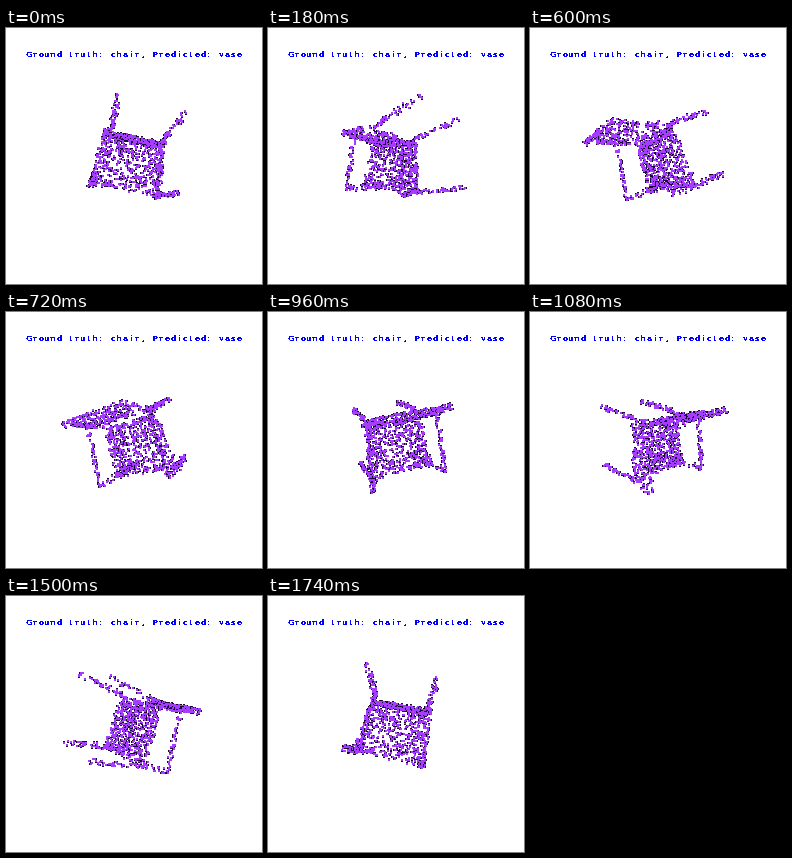
A matplotlib script that plays this animation: 256 px wide and 256 px high, repeating every 1.8 s.

```python
import numpy as np
import matplotlib.pyplot as plt
from matplotlib.animation import FuncAnimation
from matplotlib.colors import to_rgba

SIZE, FRAMES, INTERVAL = 256, 30, 60
CENTER = SIZE / 2
CAMERA = CENTER / np.tan(np.radians(30))  # 60 degree field of view
PURPLE, DARK = "#a53cff", "#1c0830"
SHADE_DEPTH = 7
TITLE = "Ground truth: chair, Predicted: vase"
PITCH = 6

plt.rcParams["text.antialiased"] = False
rng = np.random.default_rng(12)


def vec(*p):
    return np.array(p, float)


# Seat corners: back/front, left/right
seat_bl, seat_br = vec(-23, 23, 2), vec(30, 11, -6)
seat_fl, seat_fr = vec(-41, -26, 12), vec(24, -38, 3)
# Leg tips
tip_bl, tip_br = vec(-12, 47.5, 51.6), vec(41.6, 35, 44.6)
tip_fl, tip_fr = vec(-27, -17.5, 63.5), vec(32.5, -28, 56.3)
# Armrests
arm_bl, arm_br = vec(-33, 26, -25), vec(31, 14, -33)
arm_fl, arm_fr = vec(-45, -30, -15), vec(25, -46, -23)
# Top of the backrest
top_l, top_r = vec(-32, 26, -58), vec(25, 13.5, -65)

NORMAL = vec(0.15, 0.145, 0.975)
# Rear legs start a little behind the seat
REAR = vec(1.8, 7.7, -1.4)


def bar(a, b, n, width=2.0):
    t = rng.random((n, 1))
    return a + t * (b - a) + rng.uniform(-width, width, (n, 3))


def panel(a, b, c, d, n, normal, half):
    """Two faces of a thin slab with corners a-b and c-d."""
    s, t = rng.random((2, n, 1))
    mid = (1 - t) * ((1 - s) * a + s * b) + t * ((1 - s) * c + s * d)
    side = rng.choice([-half, half], (n, 1)) + rng.normal(0, 0.5, (n, 1))
    return mid + side * normal


def build_chair():
    back_normal = np.cross(top_r - top_l, NORMAL)
    back_normal /= np.linalg.norm(back_normal)
    parts = [
        panel(seat_bl, seat_br, seat_fl, seat_fr, 430, NORMAL, 3.5),
        panel(arm_bl, arm_br, top_l, top_r, 170, back_normal, 2),
        bar(top_l, top_r, 40),
        bar(seat_bl, seat_br, 50, 2.6),
        bar(seat_bl, seat_fl, 25, 2.4),
        bar(seat_br, seat_fr, 25, 2.4),
        bar(seat_fl, seat_fr, 25, 2.2),
    ]
    for corner, tip in ((seat_bl + REAR, tip_bl), (seat_br + REAR, tip_br),
                        (seat_fl, tip_fl), (seat_fr, tip_fr)):
        parts.append(bar(corner, tip, 42, 2.4))
    for back, front, seat_back, seat_front, top in (
            (arm_bl, arm_fl, seat_bl, seat_fl, top_l),
            (arm_br, arm_fr, seat_br, seat_fr, top_r)):
        parts += [bar(back, front, 45), bar(front, seat_front, 22, 2.4),
                  bar(back, seat_back + REAR / 2, 24, 2.6),
                  bar(back, top, 24)]
    return np.vstack(parts)


chair = build_chair()
count = len(chair)
# Each dot has a dark copy peeking out on one side
shift = np.array([(1, 0), (0, 1), (-1, 0), (0, -1)])[rng.integers(0, 4, count)]
colors = np.repeat([to_rgba(DARK), to_rgba(PURPLE)], count, axis=0)

fig = plt.figure(figsize=(SIZE / 72, SIZE / 72), dpi=72, facecolor="white")
ax = fig.add_axes([0, 0, 1, 1])
ax.set(xlim=(0, SIZE), ylim=(SIZE, 0))
ax.axis("off")
for k, char in enumerate(TITLE):
    ax.text(20 + PITCH * (k + 0.5), 29, char, color="#0000ff", ha="center",
            va="baseline", family="DejaVu Serif", weight="bold", size=8)
dots = ax.scatter(np.zeros(2 * count), np.zeros(2 * count), s=4, marker="s",
                  c=colors, linewidths=0, antialiased=False, snap=False)


def project(angle):
    x, y, z = chair.T
    c, s = np.cos(angle), np.sin(angle)
    depth = z * c - x * s
    scale = CAMERA / (CAMERA - depth)
    xy = np.column_stack([CENTER + scale * (x * c + z * s),
                          CENTER - scale * y])
    return np.round(xy), depth


def update(i):
    xy, depth = project(2 * np.pi * i / FRAMES)
    # Dark copies sit slightly behind, so dense areas merge
    order = np.argsort(np.r_[depth - SHADE_DEPTH, depth], kind="stable")
    dots.set_offsets(np.vstack([xy + shift, xy])[order])
    dots.set_facecolors(colors[order])
    return (dots,)


anim = FuncAnimation(fig, update, frames=FRAMES, interval=INTERVAL,
                     repeat=True, repeat_delay=0)
plt.show()
```
